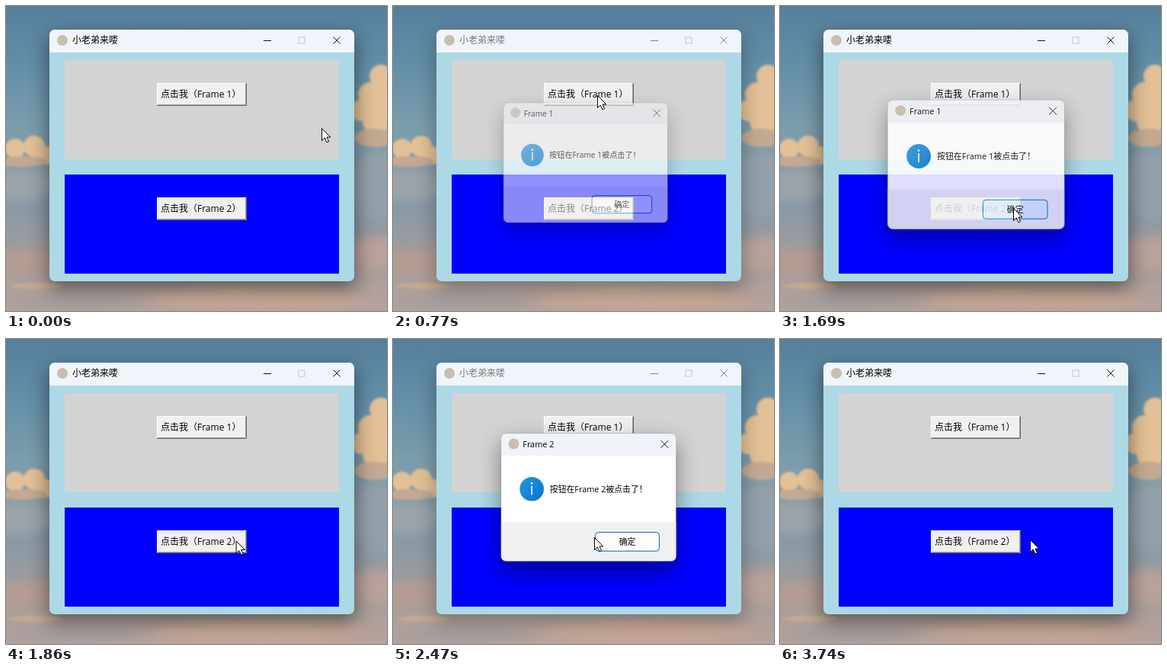
Write an HTML page that moves like this. It is 500 px wide and 400 px high and loops after 3.82 s.

```html
<!DOCTYPE html>
<html lang="zh-CN">
<head>
<meta charset="utf-8">
<style>
  html, body { margin: 0; width: 100%; height: 100%; overflow: hidden; }
  svg { display: block; width: 500px; height: 400px; }
  text { font: 12px "Open Sans", "Noto Sans CJK SC", sans-serif; white-space: pre; }
  #dialog text { font-size: 11px; }
  #shadow { filter: blur(13px); }
  #dialog { filter: drop-shadow(0 12px 14px rgba(0, 0, 0, .42)); }
  .haze { filter: blur(7px); }
  .cloud { filter: blur(1.5px); }
  .line { fill: none; stroke: #111; }
</style>
</head>
<body>
<svg viewBox="0 0 500 400">
  <defs>
    <linearGradient id="sky" x2="0" y2="1">
      <stop offset="0" stop-color="#557f9b"/>
      <stop offset=".2" stop-color="#648fa8"/>
      <stop offset=".4" stop-color="#7c9dab"/>
      <stop offset=".65" stop-color="#8799a6"/>
      <stop offset=".85" stop-color="#a79d9b"/>
      <stop offset="1" stop-color="#b6a39b"/>
    </linearGradient>
    <linearGradient id="info" x2="1" y2="1">
      <stop offset="0" stop-color="#2598e2"/>
      <stop offset="1" stop-color="#0874c9"/>
    </linearGradient>
    <clipPath id="dialogClip"><rect x="141" y="123" width="233" height="170" rx="7"/></clipPath>
    <clipPath id="windowClip"><rect x="57" y="31" width="400" height="330" rx="7"/></clipPath>
  </defs>

  <rect width="500" height="400" fill="url(#sky)"/>
  <g class="haze">
    <ellipse cx="15" cy="235" rx="50" ry="22" fill="#9aa3a8"/>
    <ellipse cx="490" cy="235" rx="45" ry="45" fill="#93a0aa"/>
    <ellipse cx="30" cy="335" rx="60" ry="14" fill="#b49c91"/>
    <ellipse cx="490" cy="325" rx="45" ry="22" fill="#b8a29a"/>
    <ellipse cx="330" cy="385" rx="140" ry="14" fill="#c7a796"/>
    <ellipse cx="90" cy="388" rx="90" ry="9" fill="#a29c9e"/>
  </g>
  <g class="cloud">
    <g fill="#e3c095">
      <circle cx="12" cy="187" r="13"/><circle cx="37" cy="184" r="14"/><circle cx="52" cy="196" r="12"/>
      <circle cx="492" cy="92" r="15"/><circle cx="478" cy="116" r="16"/><circle cx="497" cy="125" r="22"/>
      <circle cx="466" cy="137" r="14"/><circle cx="486" cy="151" r="18"/>
    </g>
    <g fill="#c3a991">
      <ellipse cx="22" cy="204" rx="32" ry="7"/><ellipse cx="484" cy="173" rx="27" ry="12"/>
      <ellipse cx="300" cy="374" rx="30" ry="3"/><ellipse cx="40" cy="367" rx="35" ry="4"/>
    </g>
  </g>

  <rect id="shadow" x="55" y="39" width="404" height="332" rx="8"/>
  <g clip-path="url(#windowClip)">
    <rect x="57" y="31" width="400" height="330" fill="#add8e6"/>
    <rect x="57" y="31" width="400" height="30" fill="#f1f4fa"/>
    <circle cx="74" cy="45" r="7" fill="#c9bdae"/>
    <g id="caption">
      <text x="87" y="49">小老弟来喽</text>
      <path class="line" d="M338 45.5h10M429.5 40.5l9 9m0-9l-9 9"/>
    </g>
    <rect class="line" x="384" y="41" width="8" height="8" style="stroke:#c4c6ca"/>
    <rect x="77" y="71" width="360" height="130" fill="#d3d3d3"/>
    <rect x="77" y="221" width="360" height="130" fill="#00f"/>
    <g id="buttons"></g>
  </g>

  <g id="dialog">
    <g clip-path="url(#dialogClip)">
      <rect x="141" y="123" width="233" height="170" fill="#fff"/>
      <rect x="141" y="123" width="233" height="30" fill="#f0f3f9"/>
      <rect x="141" y="241" width="233" height="52" fill="#f0f0f0"/>
    </g>
    <rect x="141" y="123" width="233" height="170" rx="7" fill="none" stroke="#777" stroke-opacity=".5" stroke-width=".7"/>
    <circle cx="158" cy="137" r="7" fill="#c9bdae"/>
    <text id="dialogTitle" x="170" y="142"></text>
    <path class="line" d="M353.5 132.5l10 10m0-10l-10 10"/>
    <circle cx="182" cy="197" r="16" fill="url(#info)"/>
    <path d="M182 193v12" stroke="#fff" stroke-width="1.6"/>
    <circle cx="182" cy="189.5" r="1.3" fill="#fff"/>
    <text id="message" x="206" y="201"></text>
    <rect id="ok" x="266.5" y="254.5" width="85" height="25" rx="4"/>
    <text x="298" y="271">确定</text>
  </g>

  <circle id="halo" r="12.5" fill="#ffff38" opacity=".62"/>
  <path id="cursor" d="M.5.5V16.5L4.2 13L7 18.8L9.6 17.6L7 12H11.8Z" fill="#fff" stroke="#000" stroke-linejoin="round"/>
</svg>

<script>
const LOOP = 3820, TICKS = 50;
const $ = id => document.getElementById(id);

// [tick, x, y] of the pointer tip
const route = [
  [0, 414, 160], [7, 268, 117], [10, 268, 117], [14, 286, 200], [19, 306, 265],
  [23, 306, 265], [28, 264, 260], [35, 264, 260], [41, 304, 267], [44, 304, 267], [49, 328, 263]
];
const presses = [8, 20, 29, 42];
const dialogs = [{ number: 1, open: 10, close: 22 }, { number: 2, open: 31, close: 44 }];
// [scale, opacity] per tick
const opening = [[.925, .57], [.987, 1]];
const closing = [[.997, .87], [.95, .3]];

function pointerAt(tick) {
  const i = Math.max(1, route.findIndex(p => p[0] >= tick));
  const [t0, x0, y0] = route[i - 1], [t1, x1, y1] = route[i];
  const u = (tick - t0) / (t1 - t0), e = u * u * (3 - 2 * u);
  return [x0 + (x1 - x0) * e, y0 + (y1 - y0) * e];
}

function tkButton(number, y, sunken) {
  const [light, dark] = sunken ? ['#696969', '#fff'] : ['#fff', '#696969'];
  const inner = sunken ? 'M199.5 28.5V1.5H315' : 'M199 28.5H314.5V1';
  const shift = sunken ? 1 : 0;
  return `<g transform="translate(0 ${y})">
    <rect x="198" width="118" height="30" fill="#f0f0f0"/>
    <path d="${inner}" fill="none" stroke="#a0a0a0"/>
    <path d="M198.5 30V.5H316" fill="none" stroke="${light}"/>
    <path d="M198 29.5H315.5V0" fill="none" stroke="${dark}"/>
    <text x="${203 + shift}" y="${19 + shift}">点击我（Frame ${number}）</text></g>`;
}

function drawDialog(tick, x, y) {
  const box = dialogs.find(d => tick >= d.open && tick < d.close + closing.length);
  $('dialog').style.display = box ? '' : 'none';
  if (!box) return false;
  const [scale, opacity] = closing[tick - box.close] || opening[tick - box.open] || [1, 1];
  const hover = x > 266 && x < 352 && y > 254 && y < 280;
  $('dialog').setAttribute('transform', `translate(194 176) scale(${scale}) translate(-194 -176)`);
  $('dialog').setAttribute('opacity', opacity);
  $('dialogTitle').textContent = `Frame ${box.number}`;
  $('message').textContent = `按钮在Frame ${box.number}被点击了！`;
  $('ok').setAttribute('fill', hover ? '#e0eef9' : '#fdfdfd');
  $('ok').setAttribute('stroke', hover ? '#0078d4' : '#0a62b0');
  return tick < box.close;
}

function draw(now) {
  const tick = Math.floor((now % LOOP + 6) / (LOOP / TICKS)) % TICKS;
  const [x, y] = pointerAt(tick);
  const pressed = presses.findIndex(p => tick === p || tick === p + 1);
  const modal = drawDialog(tick, x, y);

  $('buttons').innerHTML = tkButton(1, 101, pressed === 0) + tkButton(2, 251, pressed === 2);
  $('caption').setAttribute('opacity', modal ? .5 : 1);
  $('shadow').setAttribute('opacity', modal ? .28 : .45);
  $('halo').style.display = pressed < 0 ? 'none' : '';
  for (const id of ['halo', 'cursor']) $(id).setAttribute('transform', `translate(${x} ${y})`);
}

let start;
function loop(now) {
  start ??= now;
  draw(now - start);
  requestAnimationFrame(loop);
}
draw(0);
requestAnimationFrame(loop);
</script>
</body>
</html>
```
